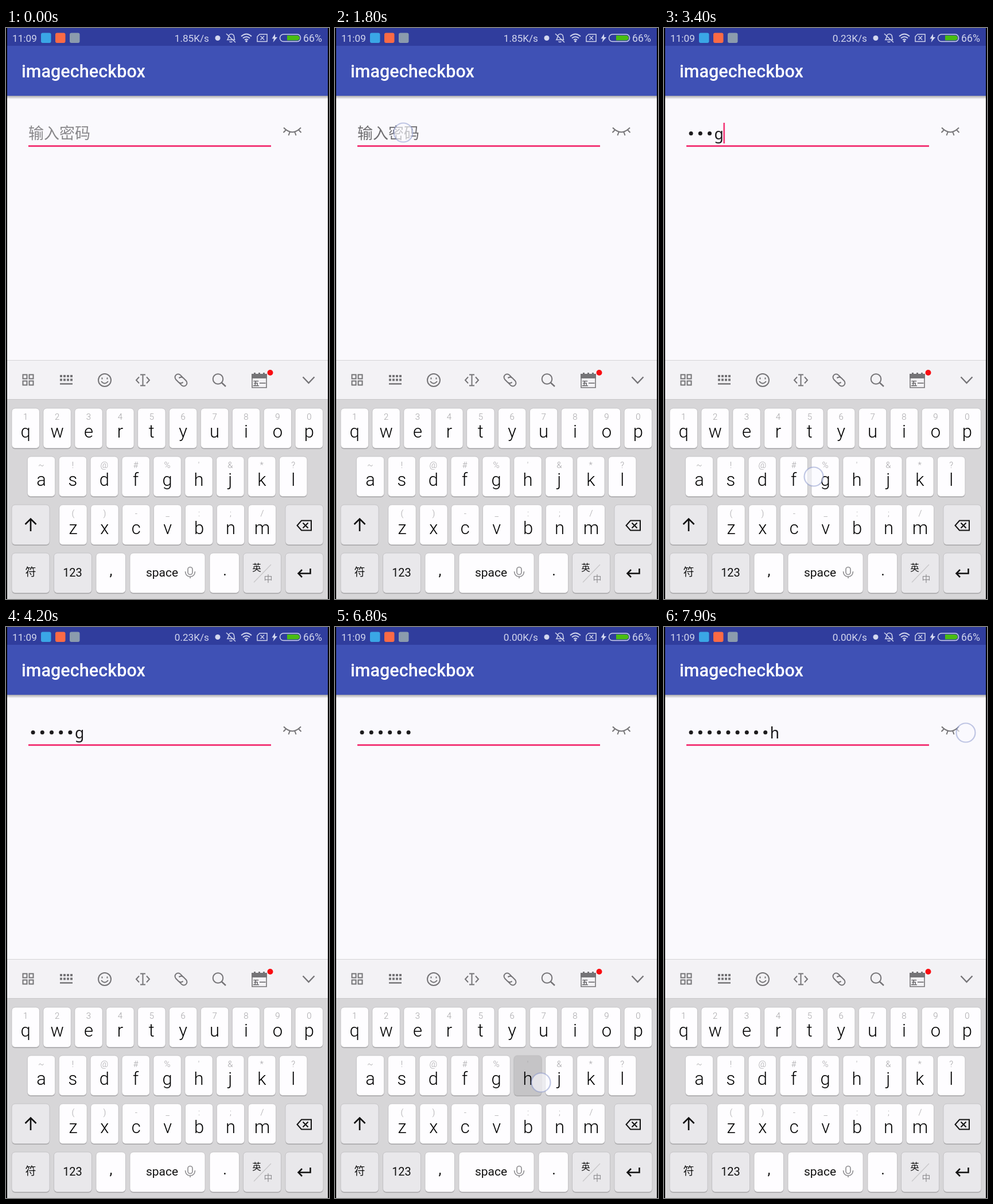
An HTML page for the animation above (8 s loop, 563 by 994 pixels).

```html
<!DOCTYPE html>
<html lang="zh">
<head>
<meta charset="utf-8">
<title>Password field</title>
<style>
  html, body { margin: 0; width: 100%; height: 100%; overflow: hidden; background: #000; }
  svg { display: block; width: 563px; height: 994px; font-family: Roboto, sans-serif; }
  .cjk { font-family: "Noto Sans CJK SC", "Noto Sans CJK", sans-serif; }
  .mono { font-family: "Noto Sans Mono", monospace; }
  .mid { text-anchor: middle; }
  .line { fill: none; stroke: #757477; stroke-width: 2; }
  .ink { fill: none; stroke: #111; stroke-width: 2.6; }
  .status { fill: none; stroke: #cfd3ec; stroke-width: 1.5; }
  .letter { font-size: 31px; font-weight: 300; fill: #000; }
  .hint { font-size: 15px; font-weight: 300; fill: #a3a2a5; }
</style>
</head>
<body>
<svg id="stage" viewBox="0 0 563 994">
  <defs>
    <linearGradient id="shade" x2="0" y2="1">
      <stop stop-color="#000" stop-opacity=".32"/>
      <stop offset="1" stop-color="#000" stop-opacity="0"/>
    </linearGradient>
  </defs>
  <path fill="#faf9fd" d="M2 0H561V994H2z"/>
  <path fill="#303d9d" d="M2 0H561V31H2z"/>
  <path fill="#3f51b5" d="M2 31H561V118H2z"/>
  <rect x="2" y="118" width="559" height="6" fill="url(#shade)"/>

  <!-- status bar -->
  <g fill="#d3d7ee" font-size="17.2">
    <text x="11" y="24">11:09</text>
    <text id="speed" x="354" y="24" text-anchor="end"></text>
    <text x="518" y="24" font-size="17.7">66%</text>
    <rect x="61" y="8.500" width="17.500" height="17.500" rx="3" fill="#3aa6e6"/>
    <rect x="86" y="8.500" width="17.500" height="17.500" rx="3" fill="#fb6a45"/>
    <rect x="111" y="8.500" width="17.500" height="17.500" rx="3" fill="#8b9bad"/>
    <circle cx="369" cy="17.500" r="4.500"/>
    <path d="M469 10L463.500 18.500H467L465.500 25L473 16H469z"/>
    <circle cx="419" cy="23" r="1.800"/>
  </g>
  <g class="status">
    <path d="M386 20.500C389 17 387 10 393 10.500C399 11 397 17 398.500 20.500zM389.500 23.500Q392 25.500 394.500 23.500M384 10L400 25"/>
    <path d="M410 14.500Q419 6.500 428 14.500M413 17.800Q419 12.500 425 17.800M416 20.800Q419 18.300 422 20.800" stroke-width="1.900"/>
    <path d="M442 11H455V23.500H438V15zM443.500 14L450 20.500M450 14L443.500 20.500"/>
    <rect x="477.500" y="11" width="36" height="12.500" rx="6"/>
  </g>
  <path fill="#49bd12" d="M490 13H507.500A4.300 4.300 0 0 1 507.500 21.600H490z"/>

  <text x="27" y="86" font-size="30.6" font-weight="500" fill="#fff">imagecheckbox</text>

  <!-- password field -->
  <text id="placeholder" class="cjk" x="39" y="193" font-size="27" font-weight="300">输入密码</text>
  <g id="dots" fill="#1c1b1d"></g>
  <text id="typed" y="193.500" font-size="27" fill="#1c1b1d"></text>
  <rect id="cursor" y="165" width="2.700" height="36" fill="#f33b79"/>
  <path stroke="#f33b79" stroke-width="3" d="M39 205.500H462"/>
  <path id="shut" class="line" stroke-width="2.800" d="M484 173.500Q499 189 514 173.500M487.500 178L483.500 182M494.500 181.500L492.500 187M503.500 181.500L505.500 187M510.500 178L514.500 182"/>
  <g id="open" class="line" stroke-width="2.600">
    <path d="M484 180.500C491 166 507 166 514 180.500C507 195 491 195 484 180.500z"/>
    <circle cx="499" cy="180.500" r="5.200"/>
  </g>

  <!-- keyboard toolbar -->
  <path fill="#f3f2f5" d="M2 578H561V647H2z"/>
  <path fill="#d5d4d6" d="M2 578H561V579H2z"/>
  <path fill="#d7d6d8" d="M2 647H561V994H2z"/>
  <path fill="#c9c8ca" d="M2 646H561V647H2z"/>
  <g class="line">
    <path d="M29.500 603.500h7v7h-7zM40.500 603.500h7v7h-7zM29.500 614.500h7v7h-7zM40.500 614.500h7v7h-7z"/>
    <path stroke-width="4" stroke-dasharray="4 2" d="M94 606H116M94 612.500H116"/>
    <path stroke-width="2.500" d="M94 619.500H116"/>
    <circle cx="172" cy="613" r="11"/>
    <path d="M166 615Q172 622.500 178 615M167.500 608.500V611.500M176.500 608.500V611.500"/>
    <path d="M232 607.500L227 613L232 618.500M245 607.500L250 613L245 618.500M234 603.500H243M234 622.500H243M238.500 603.500V622.500"/>
    <path transform="rotate(45 305 613)" d="M304 607.500H298A5.500 5.500 0 0 0 298 618.500H305A5.500 5.500 0 0 0 310 613M306 618.500H312A5.500 5.500 0 0 0 312 607.500H305A5.500 5.500 0 0 0 300 613"/>
    <circle cx="369.500" cy="611" r="8.800"/>
    <path stroke-width="2.400" d="M376 617.500L383 624M517.500 607.500L527.500 618L537.500 607.500"/>
    <path d="M429 604V626H454V604" stroke-width="1.600"/>
  </g>
  <path fill="#757477" d="M428 602H432V600H435V602H440V600H443V602H448V600H451V602H455V610H428z"/>
  <text class="cjk mid" x="441.500" y="622.500" font-size="11.500" font-weight="700" fill="#656467">五一</text>
  <circle cx="460.500" cy="600" r="5" fill="#f90d12"/>

  <g id="keys"></g>

  <!-- key legends -->
  <g class="ink">
    <path d="M43 876V854M33.500 864L43 854.500L52.500 864"/>
    <path stroke-width="2" d="M515 857.500H532V874.500H515L507.500 866zM517.500 861.500L526.500 870.500M526.500 861.500L517.500 870.500"/>
    <path d="M530.500 941V949.500H510M516 943L509.500 949.500L516 956"/>
    <path stroke="#c8c7c9" stroke-width="1.300" d="M432 965L462 934"/>
  </g>
  <g class="line" stroke="#929194" style="stroke:#929194;stroke-width:1.700">
    <rect x="317" y="938.500" width="8" height="13" rx="4"/>
    <path d="M312.500 946Q313 955 321 955Q329 955 329.500 946M321 955V958"/>
  </g>
  <g class="mid" fill="#111">
    <text class="cjk" x="43" y="954" font-size="19">符</text>
    <text x="116" y="955" font-size="20">123</text>
    <text x="183" y="953" font-size="25">,</text>
    <text x="272" y="955" font-size="21">space</text>
    <text x="381.500" y="953" font-size="25">.</text>
    <text class="cjk" x="437" y="945" font-size="15.500" font-weight="500">英</text>
    <text class="cjk" x="457" y="964" font-size="15" fill="#8f8e91">中</text>
  </g>

  <circle id="touch" r="16.500" fill="#fbfbff" fill-opacity=".62" stroke="#7d8cc6" stroke-opacity=".48" stroke-width="2.200"/>
</svg>
<script>
const LOOP = 8000, LEFT = 39, MONO = 16.2, SANS = 15.15;
const $ = id => document.getElementById(id);
const within = (t, [from, to]) => t >= from && t < to;
const show = (el, on) => el.setAttribute('visibility', on ? 'visible' : 'hidden');

// keyboard
const esc = s => s.replace('&', '&amp;');
const cap = (x, y, w, fill, id = '') =>
  `<rect x="${x}" y="${y + 1.5}" width="${w}" height="69.5" rx="6" fill="#a9a8aa"/>` +
  `<rect ${id} x="${x}" y="${y}" width="${w}" height="69.5" rx="6" fill="${fill}" stroke="#b9b8ba" stroke-width=".7"/>`;
const rows = [
  ['qwertyuiop', '1234567890', 10, 662],
  ['asdfghjkl', "~!@#%'&*?", 37.3, 746],
  ['zxcvbnm', '()-_:;/', 92.8, 830]
];
let html = '';
for (const [letters, hints, x0, y] of rows) {
  [...letters].forEach((c, i) => {
    const x = x0 + i * 54.9, mid = x + 24.2;
    html += cap(x, y, 48.4, '#fefdff', `id="key-${c}"`) +
      `<text class="hint mid" x="${mid}" y="${y + 20}">${esc(hints[i])}</text>` +
      `<text class="letter mid" x="${mid}" y="${y + 51}">${c}</text>`;
  });
}
const grey = '#e9e8eb', white = '#fefdff';
for (const [x, y, w, fill] of [
  [10, 830, 66, grey], [487, 830, 66, grey], [10, 914, 66, grey], [83.5, 914, 66, grey],
  [157, 914, 51.5, white], [216, 914, 131, white], [355, 914, 51.5, white],
  [413.5, 914, 66, grey], [487, 914, 66, grey]
]) html += cap(x, y, w, fill);
$('keys').innerHTML = html;

// timeline
const strokes = [
  ...[2900, 3080, 3260, 3400, 3600, 3800].map(at => ['g', at]),
  ...[6900, 7100, 7250, 7400].map(at => ['h', at])
];
const blinks = [[300, 700], [1200, 1700], [2200, 4200], [4700, 5300], [5800, 6400], [6900, 7900]];
const touches = [
  [1600, 2100, 119, 182], [2600, 3450, 261, 781], [3450, 3650, 290, 794], [3650, 3900, 303, 804],
  [4700, 4900, 509, 186], [5800, 6100, 531, 185], [6700, 7600, 359, 793], [7900, 8000, 526, 184]
];
const REVEALED = [4800, 5900];

function draw(t) {
  const done = strokes.filter(s => s[1] <= t), n = done.length;
  const revealed = within(t, REVEALED);
  const lastShown = n > 0 && !revealed && !(n === 6 && t >= REVEALED[1]);
  const dots = revealed ? 0 : n - lastShown;

  $('speed').textContent = t < 2600 ? '1.85K/s' : t < 6600 ? '0.23K/s' : '0.00K/s';
  show($('placeholder'), !n);
  $('placeholder').setAttribute('fill', t < 600 ? '#89888b' : '#6f6e71');

  $('dots').innerHTML = Array.from({ length: dots }, (_, i) =>
    `<circle cx="${LEFT + MONO * (i + .5)}" cy="183.500" r="3.500"/>`).join('');
  const typed = $('typed');
  typed.textContent = revealed ? done.map(s => s[0]).join('') : lastShown ? done[n - 1][0] : '';
  typed.setAttribute('x', LEFT + dots * MONO);
  typed.setAttribute('class', revealed ? '' : 'mono');

  $('cursor').setAttribute('x', LEFT + n * (revealed ? SANS : MONO) - .4);
  show($('cursor'), blinks.some(b => within(t, b)));
  show($('open'), revealed);
  show($('shut'), !revealed);

  for (const c of 'gh') {
    const down = strokes.some(([key, at]) => key === c && within(t, [at - 100, at]));
    $('key-' + c).setAttribute('fill', down ? '#c5c4c6' : white);
  }

  const touch = touches.find(p => within(t, p));
  show($('touch'), touch);
  if (touch) $('touch').setAttribute('transform', `translate(${touch[2]} ${touch[3]})`);
}

const start = performance.now();
function tick() {
  draw((performance.now() - start) % LOOP);
  requestAnimationFrame(tick);
}
tick();
</script>
</body>
</html>
```
